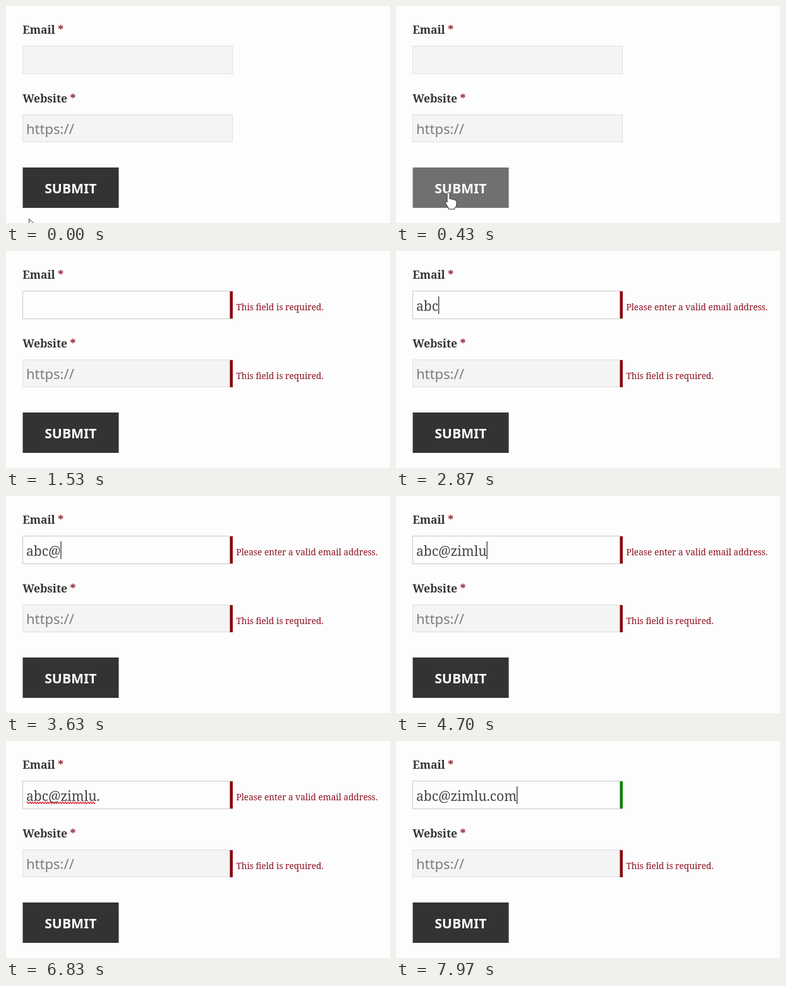
An HTML page that plays this animation: 608 by 344 pixels, repeating every 8 s.

```html
<!DOCTYPE html>
<html lang="en">
<head>
<meta charset="utf-8">
<title>Form validation</title>
<style>
  html, body { margin: 0; width: 100%; height: 100%; overflow: hidden; background: #fdfdfd; }
  svg { display: block; width: 608px; height: 344px; }
  text { white-space: pre; }
  .label { font: bold 17.5px "Noto Serif", serif; fill: #333; }
  .star { fill: #8b1a26; }
  .error { font: 13.67px "Noto Serif", serif; fill: #8a1020; }
  .typed { font: 21px "Noto Serif", serif; fill: #444; }
  .hint { font: 22px "Noto Sans", sans-serif; fill: #7c7c7c; }
  .submit { font: bold 21.2px "Noto Sans", sans-serif; fill: #fdfdfd; text-anchor: middle; }
  .field { fill: #f4f4f4; stroke: #dfdfe2; }
  .field.focus { fill: #fdfdfd; stroke: #c8c8c8; }
  .bar { fill: #860006; }
  .bar.valid { fill: #008000; }
  .wave { fill: none; stroke: #e02030; stroke-width: 1.4; }

  #button, #cursor, #arrow, #hand { animation: 8s infinite; }
  #button { fill: #333; animation-name: hover; animation-timing-function: step-end; }
  #cursor { animation-name: move; }
  #arrow { animation-name: arrow; animation-timing-function: step-end; }
  #hand { animation-name: hand; animation-timing-function: step-end; }
  @keyframes hover { 0%, 9.2% { fill: #333; } 1.8% { fill: #707070; } }
  @keyframes arrow { 0%, 9.2% { opacity: 1; } 1.8% { opacity: 0; } }
  @keyframes hand { 0%, 9.2% { opacity: 0; } 1.8% { opacity: 1; } }
  @keyframes move {
    0% { transform: translate(36px, 337px); animation-timing-function: ease-in-out; }
    4.6%, 7.8% { transform: translate(83px, 296px); animation-timing-function: ease-in; }
    10.2%, 100% { transform: translate(72px, 350px); }
  }
</style>
</head>
<body>
<svg viewBox="0 0 608 344">
  <text class="label" x="26.3" y="44">Email <tspan class="star">*</tspan></text>
  <rect id="email" class="field" x="26.5" y="63.5" width="332" height="44"/>
  <rect id="emailBar" class="bar" x="354.5" y="64" width="4.5" height="43"/>
  <text id="emailError" class="error" x="364.4" y="94"></text>
  <path id="wave" class="wave"/>
  <text id="typed" class="typed" x="32" y="94.5"></text>
  <rect id="caret" y="72" width="1.2" height="28" fill="#222"/>

  <text class="label" x="26.3" y="153">Website <tspan class="star">*</tspan></text>
  <rect class="field" x="26.5" y="172.5" width="332" height="43"/>
  <text class="hint" x="32" y="203">https://</text>
  <g id="siteError">
    <rect class="bar" x="354.5" y="173" width="4.5" height="43"/>
    <text class="error" x="364.4" y="203">This field is required.</text>
  </g>

  <rect id="button" x="26.5" y="256" width="152" height="64"/>
  <text class="submit" x="102.4" y="297">SUBMIT</text>

  <g id="cursor" fill="#fdfdfd" stroke="#333" stroke-linejoin="round">
    <path id="arrow" d="M.5 .5V17l4-3.5 2.5 6 3-1.2-2.5-6H13Z"/>
    <path id="hand" d="M-2 1Q0-2 2 1V10Q5 8 6 11Q9 9 10 12Q13 11 13 14V18Q13 22 10 24V26H0V24L-5 16Q-5 13-2 15Z"/>
  </g>
</svg>
<script>
  const LOOP = 8000, SUBMITTED = 600, BLINK = 530;
  const ADDRESS = "abc@zimlu.com";
  const KEYS = [2560, 2680, 2790, 3450, 3700, 3840, 3960, 4090, 4230, 6000, 7060, 7240, 7460];
  const DOT = ADDRESS.indexOf(".") + 1;
  const el = id => document.getElementById(id);
  const [email, emailBar, emailError, wave, typed, caret, siteError] =
    ["email", "emailBar", "emailError", "wave", "typed", "caret", "siteError"].map(el);
  const show = (node, on) => { node.style.visibility = on ? "visible" : "hidden"; };

  function errorFor(count) {
    if (!count) return "This field is required.";
    return count < DOT + 2 ? "Please enter a valid email address." : "";
  }

  function draw(t) {
    const count = KEYS.filter(key => key <= t).length;
    const submitted = t >= SUBMITTED;
    const error = submitted ? errorFor(count) : "";
    const lastInput = count ? KEYS[count - 1] : SUBMITTED;

    typed.textContent = ADDRESS.slice(0, count);
    email.classList.toggle("focus", submitted);
    emailError.textContent = error;
    emailBar.classList.toggle("valid", submitted && !error);
    show(emailBar, submitted);
    show(siteError, submitted);

    caret.setAttribute("x", 32 + (count ? typed.getComputedTextLength() : 0));
    show(caret, submitted && (t - lastInput) % (2 * BLINK) < BLINK);

    const misspelt = count === DOT;
    show(wave, misspelt);
    if (misspelt) {
      const width = typed.getSubStringLength(0, DOT - 1);
      wave.setAttribute("d", "M33 98" + "q1-2.4 2 0t2 0".repeat(Math.floor(width / 4)));
    }
  }

  let start;
  function tick(now) {
    start ??= now;
    draw((now - start) % LOOP);
    requestAnimationFrame(tick);
  }
  draw(0);
  requestAnimationFrame(tick);
</script>
</body>
</html>
```
